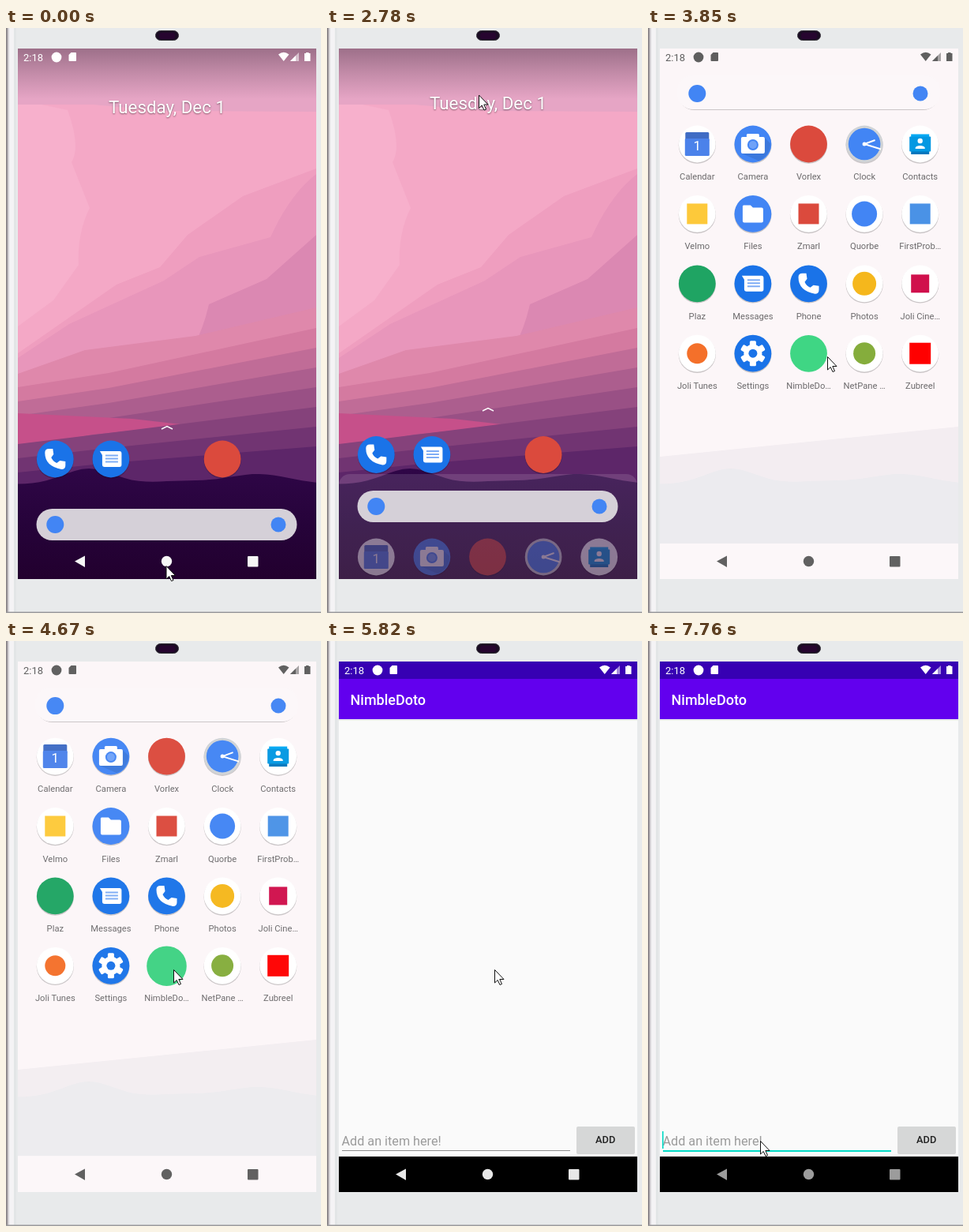
Write an HTML page that moves like this. It is 399x741 px and loops after 8000 ms.

```html
<!DOCTYPE html>
<html lang="en">
<head>
<meta charset="utf-8">
<title>Phone demo</title>
<style>
html, body { margin: 0; width: 100%; height: 100%; overflow: hidden; background: #e8eaeb; }
svg { display: block; width: 100%; height: 100%; font-family: Roboto, "Open Sans", sans-serif; }
</style>
</head>
<body>
<svg id="stage" viewBox="0 0 399 741"></svg>
<script>
const LOOP = 8000;
const BLUE = '#4285f4', DEEP = '#1a73e8', RED = '#db4a3d', PAPER = '#fcf7f9';

// ---- markup and number helpers
const rect = (x, y, w, h, fill, more = '') =>
  `<rect x="${x}" y="${y}" width="${w}" height="${h}" fill="${fill}" ${more}/>`;
const disc = (x, y, r, fill, more = '') =>
  `<circle cx="${x}" cy="${y}" r="${r}" fill="${fill}" ${more}/>`;
const path = (d, fill, more = '') => `<path d="${d}" fill="${fill}" ${more}/>`;
const text = (x, y, size, fill, str, more = '') =>
  `<text x="${x}" y="${y}" font-size="${size}" fill="${fill}" ${more}>${str}</text>`;
const group = (id, body, more = '') => `<g id="${id}" ${more}>${body}</g>`;
const put = (x, y, body, more = '') => `<g transform="translate(${x} ${y})" ${more}>${body}</g>`;
const range = n => [...Array(n).keys()];

const lerp = (a, b, u) => a + (b - a) * u;
const part = (t, from, to) => Math.min(1, Math.max(0, (t - from) / (to - from)));
const mix = (a, b, u) => `rgb(${a.map((v, i) => Math.round(lerp(v, b[i], u)))})`;
const grey = v => mix([v, v, v], [v, v, v], 0);

// ---- icons, each centred on 0,0
const plate = (fill, body = '') => disc(0, 1.2, 23.6, '#000', 'opacity=".2"') + disc(0, 0, 23.4, fill) + body;
const dot = (fill, r = 14) => plate('#fff', disc(0, 0, r, fill));
const tile = (fill, s = 26) => plate('#fff', rect(-s / 2, -s / 2, s, s, fill));
const tooth = i => rect(-4, -16, 8, 8, '#fff', `rx="1.5" transform="rotate(${60 * i})"`);

const icons = {
  calendar: plate('#fff',
    rect(-15, -15, 30, 12, '#3f6cc4', 'rx="1.5"') + rect(-15.5, -7, 31, 22, '#4b82ea', 'rx="1.5"') +
    text(0, 8, 17, '#fff', '1', 'text-anchor="middle"')),
  camera: plate(BLUE,
    path('M15 -8L22 -1A22 22 0 0 1 7 21L-14 12Z', '#3b78dc') +
    rect(-8, -13, 16, 8, '#fff', 'rx="1.5"') + rect(-15, -9, 30, 21, '#fff', 'rx="2"') +
    disc(0, 1, 7, BLUE) + disc(0, 1, 5, '#6fa2f8')),
  browser: plate(RED),
  clock: plate('#d0d3d6', disc(0, 0, 20.3, BLUE) +
    path('M0 0L21 6.5M0 0L13.5 -5', 'none', 'stroke="#fff" stroke-width="2"') + disc(0, 0, 2.5, '#fff')),
  contacts: plate('#fff',
    rect(-11.5, -12.5, 23, 6, '#03a9f4') + rect(-11.5, 7, 23, 6, '#0277bd') +
    rect(-13.5, -9.5, 27, 19, '#0398e2', 'rx="1"') + disc(0, -4, 3.2, '#fff') +
    path('M-6 6V5C-6 1 6 1 6 5V6Z', '#fff')),
  files: plate(BLUE, path('M-12 -11H-3L0 -8H11Q13 -8 13 -6V9Q13 11 11 11H-11Q-13 11 -13 9V-10Z', '#fff')),
  messages: plate(DEEP,
    path('M-14 -10H11Q13.500 -10 13.500 -7V7Q13.500 10 11 10H-8Q-11 10 -11 7V-5Z', '#fff') +
    path('M-7 -4.500H9M-7 -.5H9M-7 3.500H9', 'none', 'stroke="#7fadf5" stroke-width="2"')),
  phone: plate(DEEP, path('M-8 -13H-3L-2 -6L-5 -2Q-3 3 2 5L6 2L13 3V8Q13 13 8 13Q-13 9 -13 -8Q-13 -13 -8 -13Z', '#fff')),
  settings: plate(DEEP, range(6).map(tooth).join('') + disc(0, 0, 11.5, '#fff') + disc(0, 0, 5.5, DEEP)),
};

const apps = [
  ['Calendar', icons.calendar], ['Camera', icons.camera], ['Vorlex', icons.browser],
  ['Clock', icons.clock], ['Contacts', icons.contacts],
  ['Velmo', tile('#fdc93a')], ['Files', icons.files], ['Zmarl', tile(RED)],
  ['Quorbe', dot(BLUE, 16)], ['FirstProb…', tile('#4a92e6')],
  ['Plaz', plate('#1fa463')], ['Messages', icons.messages], ['Phone', icons.phone],
  ['Photos', dot('#f5b71c', 15)], ['Joli Cine…', tile('#d0104c', 23)],
  ['Joli Tunes', dot('#f4702a', 13)], ['Settings', icons.settings], ['NimbleDo…', ''],
  ['NetPane …', dot('#85ad3c')], ['Zubreel', tile('#f00', 27)],
];
const colX = i => 62.3 + 70.6 * (i % 5);
const appGrid = apps.map(([name, icon], i) =>
  put(colX(i), 147 + 88.4 * Math.floor(i / 5),
    icon + text(0, 45, 11.2, '#6c6a6c', name, 'text-anchor="middle"'))).join('');

// ---- wallpaper
const bump = (x, mid, width) => Math.exp(-(((x - mid) / width) ** 2));
const ridge = x => 578 - 20 * bump(x, 105, 45) - 4 * bump(x, 220, 50) - 13 * bump(x, 320, 55);
const HILLS = 'M15 698' + range(43).map(i => `L${15 + 9 * i} ${ridge(15 + 9 * i).toFixed(1)}`).join('') + 'V698Z';
const band = i => path(`M15 ${455 + 18 * i}L130 ${437 + 19 * i} 393 ${380 + 25 * i}V698H15Z`,
  mix([212, 122, 160], [93, 38, 105], i / 6));

const wallpaper =
  rect(15, 26, 378, 672, '#f4a8c6') +
  path('M15 26H393V106L200 105 110 97H15Z', '#e6a5c5') +
  path('M15 97H45L78 104Q95 150 83 170L106 228Q90 260 92 300L60 345 15 378Z', '#f7b0cc') +
  path('M393 178L300 213 230 262 195 303 140 325 15 412V698H393Z', '#ef9ebf') +
  path('M393 185Q360 210 335 265L245 290 200 320 80 375 15 418V698H393Z', '#e896bb') +
  path('M393 262L330 318 257 350Q250 380 240 398L120 440H393Z', '#db88b2') +
  path('M15 438L100 408 240 390 393 354V698H15Z', '#df88ab') +
  range(4).map(band).join('') +
  path('M15 488L160 495 230 503 110 515 15 532Z', '#c6508a') +
  range(3).map(i => band(i + 4)).join('') +
  path(HILLS, 'url(#night)') + rect(15, 26, 378, 64, 'url(#dusk)');

// ---- screens
const searchMarks = y => disc(62.3, y, 11, BLUE) + disc(345, y, 9.5, BLUE);

const home = wallpaper +
  group('peek', rect(15, 565, 378, 150, '#fff', 'rx="14" opacity=".12"') +
    apps.slice(0, 5).map((a, i) => put(colX(i), 670, a[1], 'opacity=".4"')).join('')) +
  group('date', text(130, 108, 22.3, '#fff', 'Tuesday, Dec 1', 'style="text-shadow:0 1px 2px #0007"')) +
  group('dock', [icons.phone, icons.messages, '', icons.browser].map((icon, i) => put(colX(i), 546, icon)).join('')) +
  group('bar', path('M197 508L204 504.5 211 508', 'none', 'stroke="#fff" stroke-width="1.4"') +
    rect(38.5, 609, 330, 40, '#d5d0d8', 'rx="20"') + searchMarks(629));

const drawer =
  rect(15, 26, 378, 672, '#a46888') +
  group('sheet', rect(15, 0, 378, 760, '#fcf6f8', 'rx="14"')) +
  path('M15 543L393 505V698H15Z', '#f3edf1') + path(HILLS, '#ecebef') +
  group('list', rect(15, 653, 378, 60, PAPER) +
    rect(38.5, 64, 330, 40, '#000', 'rx="20" opacity=".2"') +
    rect(37, 60, 333, 43, PAPER, 'rx="20"') + searchMarks(83) + appGrid) +
  rect(15, 26, 378, 672, PAPER, 'id="veil"') +
  disc(203.5, 0, 0, '', 'id="launch"') +
  rect(15, 698, 378, 8, '#e8eaeb', 'id="gap"');

const app =
  rect(15, 26, 378, 672, '#fafafa') + rect(15, 26, 378, 22, '#3700b3') +
  rect(15, 99, 378, 2, '#000', 'opacity=".06"') + rect(15, 48, 378, 51, '#6200ee') +
  text(29.5, 80.5, 18, '#fff', 'NimbleDoto', 'font-weight="500"') +
  text(18.5, 639, 16.2, '#9b9b9b', 'Add an item here!') +
  rect(19, 645, 289, 1, '#8c8c8c') +
  group('focus', rect(19, 645, 289, 2, '#03dac5') + rect(18, 621, 1.6, 22, '#03dac5')) +
  rect(316, 616, 74, 34, '#000', 'rx="2" opacity=".15"') +
  rect(316, 615, 74, 34, '#d6d7d7', 'rx="2"') +
  text(352.7, 636.3, 12.8, '#222', 'ADD', 'font-weight="500" text-anchor="middle"') +
  rect(15, 653, 378, 45, '#000');

const INK = 'currentColor';
const status =
  text(22, 42, 13, INK, '2:18') + disc(64, 37, 6.4, INK) +
  path('M82.5 31H88Q89 31 89 32V41Q89 42 88 42H80.5Q79.5 42 79.5 41V34Z', INK) +
  path('M345 33.5Q351.7 28 358.5 33.5L351.7 42Z', INK) +
  path('M371 31V42H360Z', INK, 'opacity=".55"') + path('M367 35V42H360Z', INK) +
  path('M380 32V31H383.5V32H385.5V42H378V32Z', INK);

const nav = path('M87 675.5L100 668.5V683Z', INK) + disc(203.5, 675.5, 6.7, INK) +
  rect(306, 669, 13.5, 13.5, INK, 'rx="1"');

const gradient = (id, ...stops) => `<linearGradient id="${id}" x2="0" y2="1">` +
  stops.map((c, i) => `<stop offset="${i / (stops.length - 1)}" stop-color="${c}"/>`).join('') + '</linearGradient>';

const frame =
  rect(0, 0, 399, 741, '#e8eaeb') + rect(0, 0, 2, 741, '#8e898d') + rect(2, 0, 2, 741, '#d3d0d4') +
  rect(4, 0, 6, 741, '#f4f3f5') + rect(10, 0, 3, 741, '#e2e5e6') + rect(0, 739.5, 399, 1.5, '#9a9a9c') +
  rect(189.5, 3.5, 29, 12, '#1b0c24', 'rx="6" stroke="#38363c"') + rect(194, 6, 20, 8, '#26052f', 'rx="3"');

document.getElementById('stage').innerHTML =
  '<defs>' + gradient('dusk', '#30203066', '#30203030', '#30203000') + gradient('night', '#2f0647', '#26033a', '#22002e') +
  `<clipPath id="glass">${rect(15, 26, 378, 672, '#000')}</clipPath></defs>` + frame +
  '<g clip-path="url(#glass)">' + group('home', home) + group('drawer', drawer) + group('app', app) +
  group('status', status) + group('nav', nav) + '</g>' +
  group('cursor', path('M0 0V16.5L3.7 13 6.5 19 9 18 6.3 12H11.5Z', '#fff', 'stroke="#111"'));

// ---- timing
const CUT = { drag: 2780, drawer: 2930, settle: 3060, press: 4390, release: 4520, launch: 4670, grown: 5100, app: 5820, focus: 7640 };

const BEAT = 135, LAG = 64;
const onBeat = t => Math.floor((t - LAG) / BEAT);

const easeIn = u => u * u;
const easeOut = u => u * (2 - u);
const linear = u => u;
// Pointer moves: first beat, last beat, destination, easing.
const moves = [
  [12, 15, 227, 504, easeIn],
  [15, 18, 212.5, 522, easeOut],
  [18, 20, 192.5, 85, linear],
  [20, 21, 194.5, 67.5, linear],
  [22, 24, 274.5, 286.5, linear],
  [25, 28, 227.5, 416.5, linear],
  [28, 30, 212.5, 416.5, linear],
  [47, 52, 155, 638, easeOut],
  [53, 55, 142.5, 633.5, linear],
];
function pointer(beat) {
  let x = 203, y = 681.5;
  for (const [from, to, toX, toY, ease] of moves) {
    const u = ease(part(beat, from, to));
    x = lerp(x, toX, u);
    y = lerp(y, toY, u);
  }
  return [x, y];
}

const $ = id => document.getElementById(id);
const move = (id, x, y) => $(id).setAttribute('transform', `translate(${x} ${y})`);
const set = (id, attrs) => Object.entries(attrs).forEach(([k, v]) => $(id).setAttribute(k, v));

function draw(t) {
  const beat = onBeat(t);
  const scene = t < CUT.drawer ? 'home' : t < CUT.app ? 'drawer' : 'app';
  for (const id of ['home', 'drawer', 'app']) $(id).style.display = id === scene ? '' : 'none';

  // swipe up on the home screen
  const drag = t >= CUT.drag ? 1 : 0;
  set('peek', { opacity: drag });
  move('date', 0, -5.5 * drag);
  move('dock', 0, -5.5 * drag);
  move('bar', 0, -23 * drag);

  // drawer settles, then the tapped icon grows
  const settled = t >= CUT.settle;
  const grow = t < CUT.launch ? 0 : t < CUT.grown ? .15 : 1;
  const pressed = t >= CUT.press && t < CUT.release;
  const shift = settled ? -6 * grow : 34;
  move('sheet', 0, settled ? 0 : 54);
  move('list', 0, shift);
  set('gap', { y: 698 - 7 * Math.floor(grow) });
  set('veil', { opacity: .18 * grow });
  set('launch', {
    r: lerp(23.4, 36, grow),
    cy: lerp(412.3, 408.5, grow) + (settled ? 0 : 34),
    fill: mix([63, 214, 132], [97, 197, 146], grow),
    opacity: pressed ? .85 : 1,
  });

  // system bars
  const hidden = scene === 'home' && drag;
  const dark = scene === 'drawer' && settled;
  const navTone = {
    home: 246,
    drawer: lerp(250, 97, part(beat, 21, 24)),
    app: lerp(232, 156, part(beat, 45, 52)),
  }[scene];
  set('status', { opacity: hidden ? 0 : 1 });
  set('nav', { opacity: hidden ? 0 : 1 });
  $('status').style.color = dark ? grey(lerp(95, 110, grow)) : '#fff';
  $('nav').style.color = grey(navTone);

  set('focus', { opacity: part(t, CUT.focus - 2 * BEAT, CUT.focus + BEAT / 2) * (t >= CUT.focus) });
  move('cursor', ...pointer(beat));
}

const start = performance.now();
function tick() {
  draw((performance.now() - start) % LOOP);
  requestAnimationFrame(tick);
}
tick();
</script>
</body>
</html>
```
